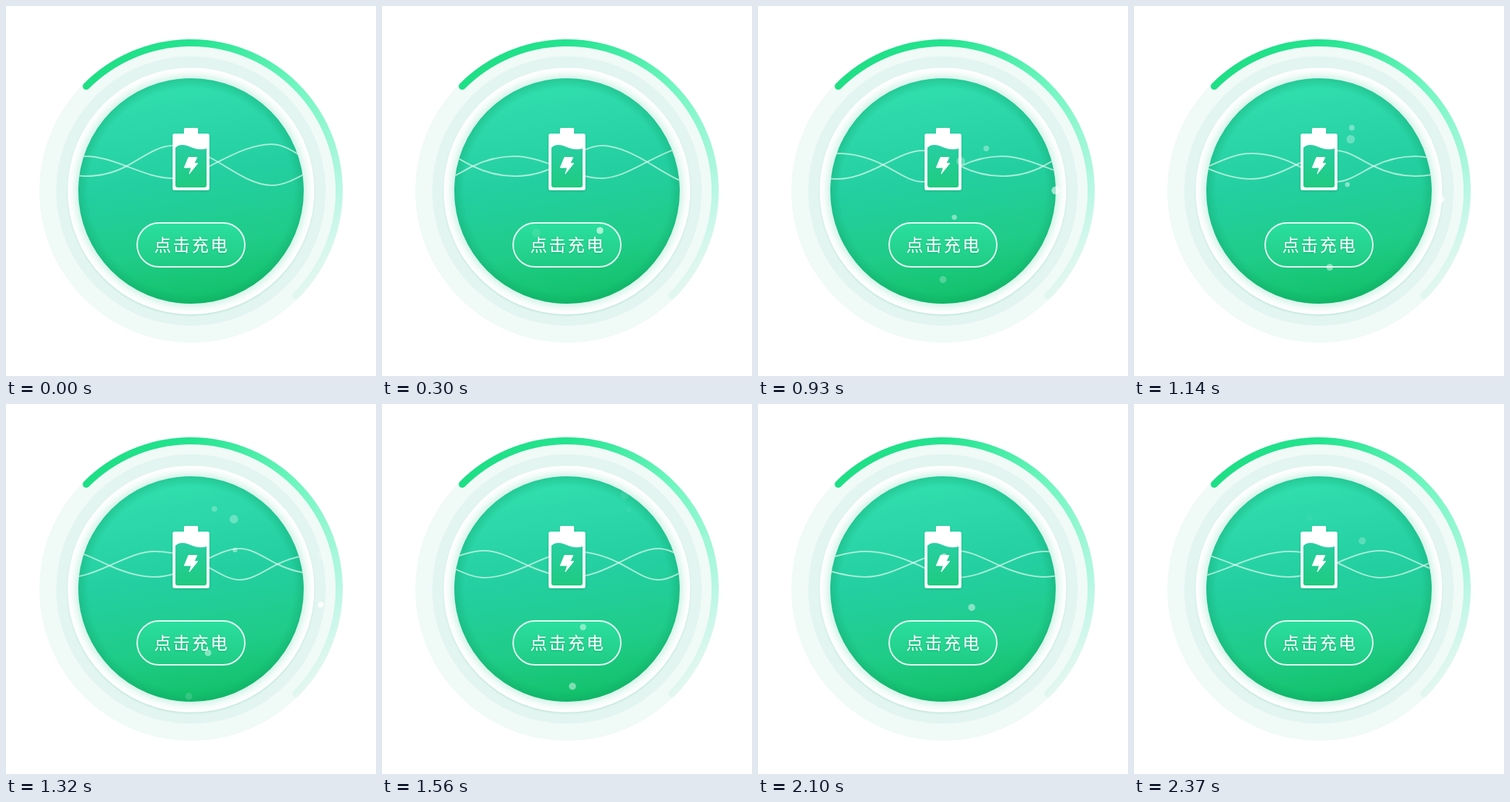
Write an HTML page that moves like this. It is 522 by 522 pixels and loops after 2.4 s.

```html
<!DOCTYPE html>
<html lang="zh">
<head>
<meta charset="utf-8">
<style>
html, body { margin: 0; width: 100%; height: 100%; overflow: hidden; background: #fff; }
svg { display: block; width: 522px; height: 522px; }
text { font: 500 24px "Noto Sans CJK SC", "Noto Sans CJK", sans-serif; letter-spacing: 2.5px; }
</style>
</head>
<body>
<svg viewBox="0 0 522 522">
  <defs>
    <linearGradient id="arc" gradientUnits="userSpaceOnUse" x1="113" y1="113" x2="410" y2="410">
      <stop offset="0" stop-color="#1fdf86"/><stop offset=".15" stop-color="#24e490"/>
      <stop offset=".5" stop-color="#70f6c0"/><stop offset=".85" stop-color="#b8f7e4"/>
      <stop offset="1" stop-color="#e2f7f0"/>
    </linearGradient>
    <linearGradient id="dish" x1=".42" y1="0" x2=".58" y2="1">
      <stop offset="0" stop-color="#31dfae"/><stop offset=".2" stop-color="#2cd7a9"/>
      <stop offset=".45" stop-color="#23cfa0"/><stop offset=".75" stop-color="#1fcc88"/>
      <stop offset="1" stop-color="#11c067"/>
    </linearGradient>
    <radialGradient id="rim">
      <stop offset=".91" stop-color="#0b9d62" stop-opacity="0"/>
      <stop offset="1" stop-color="#0b9d62" stop-opacity=".32"/>
    </radialGradient>
    <radialGradient id="collar">
      <stop offset=".91" stop-color="#d3f3e8"/><stop offset=".96" stop-color="#f3fcf9"/>
      <stop offset=".99" stop-color="#fff"/>
    </radialGradient>
    <linearGradient id="pill" x1="0" y1="0" x2="0" y2="1">
      <stop offset="0" stop-color="#2bdf9f"/><stop offset="1" stop-color="#1fcc84"/>
    </linearGradient>
    <linearGradient id="juice" x1="0" y1="0" x2="0" y2="1">
      <stop offset="0" stop-color="#27cfa2"/><stop offset="1" stop-color="#1ecb80"/>
    </linearGradient>
    <filter id="soft" x="-30%" y="-30%" width="160%" height="160%">
      <feDropShadow dx="0" dy="1" stdDeviation="1.5" flood-color="#0a8a58" flood-opacity=".4"/>
    </filter>
    <filter id="lift" x="-10%" y="-10%" width="120%" height="120%">
      <feDropShadow dx="0" dy="1.5" stdDeviation="1" flood-color="#8fd4c0" flood-opacity=".45"/>
    </filter>
    <clipPath id="disc"><circle cx="261" cy="261" r="159"/></clipPath>
  </defs>

  <circle cx="261" cy="261" r="214" fill="#f0faf7"/>
  <circle cx="261" cy="261" r="190" fill="#e2f5f0"/>
  <path d="M113.2 113.2A209 209 0 0 1 408.8 408.8" fill="none" stroke="url(#arc)" stroke-width="10" stroke-linecap="round"/>
  <circle cx="261" cy="261" r="174" fill="url(#collar)" filter="url(#lift)"/>
  <circle cx="261" cy="261" r="159" fill="url(#dish)"/>
  <circle cx="261" cy="261" r="159" fill="url(#rim)"/>

  <g clip-path="url(#disc)" fill="none" stroke="#fff" stroke-opacity=".6" stroke-width="2">
    <path id="waveA"/><path id="waveB"/>
  </g>

  <g filter="url(#soft)" fill="#fff">
    <rect x="251" y="172" width="20" height="14" rx="2"/>
    <rect x="235" y="180" width="52" height="80" rx="3"/>
  </g>
  <path d="M239 200C243 195 251 195 258 198S274 204 283 201V253q0 3 -3 3H242q-3 0 -3 -3Z" fill="url(#juice)"/>
  <path d="M257.500 213.500h12l-4 8.500h5l-12 15 3-9h-10Z" fill="#fff" stroke="#fff" stroke-linejoin="round"/>

  <rect x="185" y="306" width="152" height="62" rx="31" fill="url(#pill)" stroke="#fff" stroke-opacity=".9" stroke-width="2"/>
  <text x="209" y="345.500" fill="#fff" filter="url(#soft)">点击充电</text>
  <g id="bubbles" fill="#fff"></g>
</svg>
<script>
const LOOP = 2400, STEP = 30, SPEED = 0.25, FADE_IN = 240, FADE_OUT = 300;
const $ = id => document.getElementById(id);

// Where the two strands cross [x, y], and the peaks between [x, yA, yB]
const crossings = [[-450, 227], [-306, 224], [-184, 228], [-56, 224], [53, 226],
  [170, 226], [299, 220], [440, 227]];
const peaks = [[-515, 245, 209], [-373, 208, 244], [-245, 245, 207], [-120, 208, 244],
  [0, 248, 204], [112, 212, 240], [235, 243, 197], [375, 195, 253], [505, 245, 210]];

function strand(side) {
  const pts = [];
  peaks.forEach((p, i) => {
    pts.push([p[0], p[side], 0]);
    const n = peaks[i + 1];
    if (n) pts.push([...crossings[i], 1.5 * (n[side] - p[side]) / (n[0] - p[0])]);
  });
  return pts.map(([x, y, s], i) => {
    if (!i) return `M${x} ${y}`;
    const [px, py, ps] = pts[i - 1], h = (x - px) / 3;
    return `C${px + h} ${py + ps * h} ${x - h} ${y - s * h} ${x} ${y}`;
  }).join("");
}
$("waveA").setAttribute("d", strand(1));
$("waveB").setAttribute("d", strand(2));

const bubbles = [];
// Radius at birth and death, peak opacity, then [time, x, y] along the way
function bubble(r0, r1, alpha, ...keys) {
  const dot = document.createElementNS("http://www.w3.org/2000/svg", "circle");
  $("bubbles").appendChild(dot);
  bubbles.push({ dot, r0, r1, alpha, keys });
}
bubble(6, 6, .3, [220, 209, 333], [930, 286, 219], [1650, 350, 116]);
bubble(5.3, 3.5, .7, [90, 281, 278], [600, 345, 373], [880, 378, 431]);
bubble(4, 3, .45, [490, 244, 338], [930, 277, 298], [1320, 323, 206], [1600, 352, 140]);
bubble(4, 4, .36, [700, 333, 243], [930, 322, 201], [1320, 294, 148], [1530, 279, 119]);
bubble(6.4, 3.2, .75, [740, 408, 249], [1320, 444, 283], [1620, 462, 300]);
bubble(6, 6, .25, [1100, 435, 232], [1600, 458, 190]);
bubble(5, 4, .45, [800, 255, 407], [930, 261, 386], [1320, 285, 351], [1830, 275, 267], [2400, 246, 154]);
bubble(5, 5, .45, [1240, 254, 419], [1830, 283, 363], [2530, 334, 139]);

// Smooth curve through the keys
function along(keys, t, k) {
  const i = keys.findIndex(key => key[0] > t) - 1;
  const a = keys[i], b = keys[i + 1], p = keys[i - 1] || a, n = keys[i + 2] || b;
  const d = b[0] - a[0], u = (t - a[0]) / d, v = 1 - u;
  const m0 = (b[k] - p[k]) / (b[0] - p[0]) * d, m1 = (n[k] - a[k]) / (n[0] - a[0]) * d;
  return v * v * ((1 + 2 * u) * a[k] + u * m0) + u * u * ((1 + 2 * v) * b[k] - v * m1);
}

function draw(t) {
  for (const id of ["waveA", "waveB"]) $(id).setAttribute("transform", `translate(${t * SPEED} 0)`);
  for (const { dot, r0, r1, alpha, keys } of bubbles) {
    const born = keys[0][0], dies = keys[keys.length - 1][0];
    const alive = t >= born && t < dies;
    dot.setAttribute("visibility", alive ? "visible" : "hidden");
    if (!alive) continue;
    dot.setAttribute("cx", along(keys, t, 1));
    dot.setAttribute("cy", along(keys, t, 2));
    dot.setAttribute("r", r0 + (r1 - r0) * (t - born) / (dies - born));
    dot.setAttribute("opacity", alpha * Math.min(1, (t - born) / FADE_IN, (dies - t) / FADE_OUT));
  }
}

const start = performance.now();
function tick() {
  const t = (performance.now() - start) % LOOP;
  draw(Math.floor(t / STEP) * STEP);
  requestAnimationFrame(tick);
}
tick();
</script>
</body>
</html>
```
